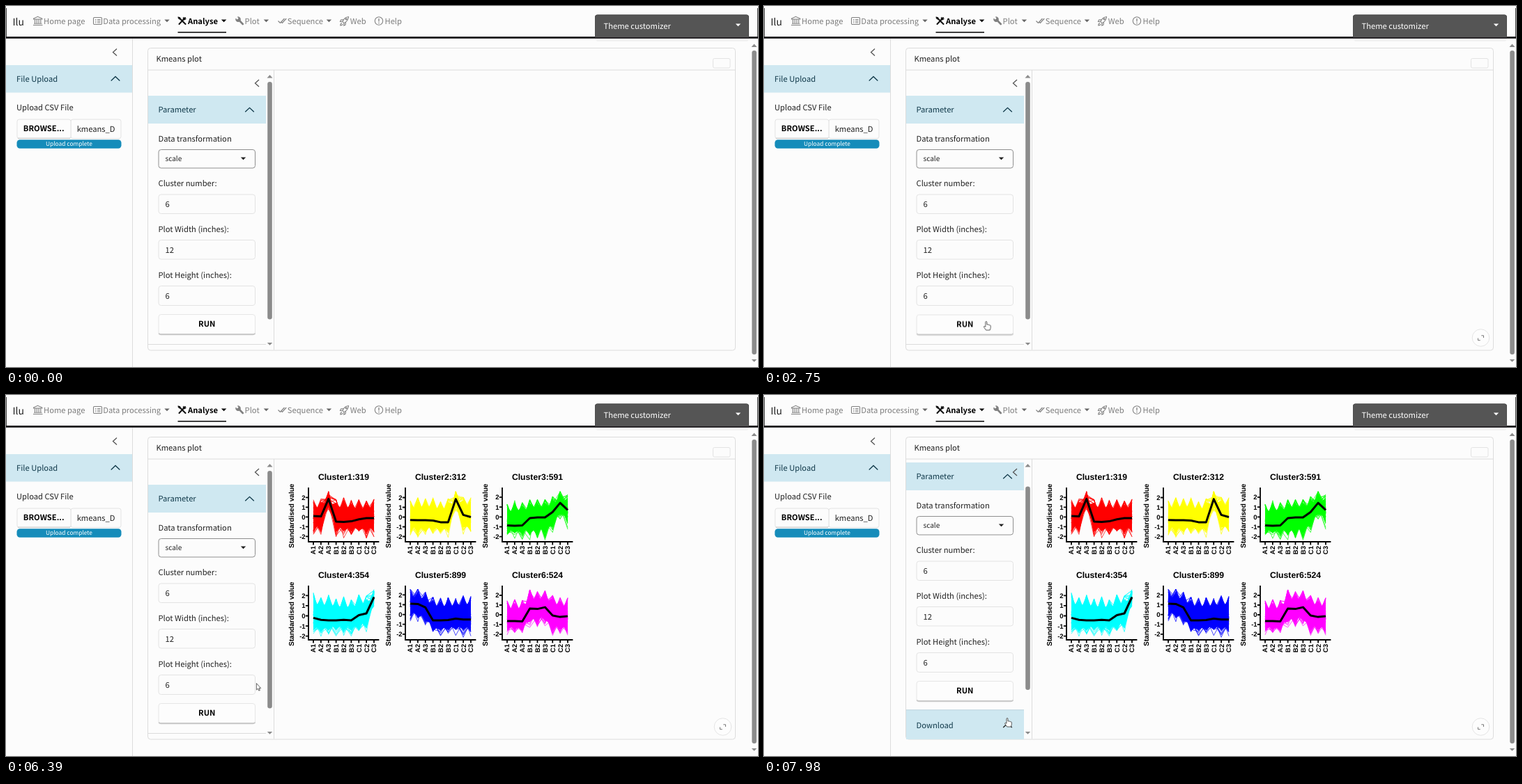
An HTML page that plays this animation: 1079x519 px, repeating every 8 s.

```html
<!DOCTYPE html>
<html lang="en">
<head>
<meta charset="utf-8">
<title>Kmeans plot</title>
<style>
html, body { margin: 0; width: 100%; height: 100%; overflow: hidden; background: #fcfcfc; }
svg { display: block; }
text {
  font: 11.2px 'Noto Sans CJK SC', 'Noto Sans CJK JP', 'Noto Sans CJK TC', 'Noto Sans CJK KR', 'Noto Sans CJK', 'Open Sans', sans-serif;
  fill: #222; white-space: pre; text-rendering: geometricPrecision;
}
.brand { font-size: 14px; }
.nav text { fill: #7d7d7d; }
.nav .on, .strong { font-weight: 700; fill: #000; }
.small { font-size: 10px; }
.tiny { font-size: 8.4px; fill: #fff; }
.head { fill: #10394a; }
.mid { text-anchor: middle; }
.blue { fill: #cfe8f1; }
.icon { fill: none; stroke: #808080; stroke-width: 1.1; }
.caret { fill: #666; }
.dark { fill: #222; }
.chev { fill: none; stroke: #10394a; stroke-width: 1.3; }
.grey { stroke: #555; }
.line { fill: none; stroke: #dcdcdc; }
.field { fill: #fcfcfc; stroke: #e3e3e3; }
.bar { fill: #8b8b8b; }
.plot text { font: 700 10.1px 'Liberation Sans', Arial, sans-serif; fill: #000; }
.plot .title { font-size: 12.2px; }
.plot .tick { font-size: 9.5px; }

#cursor, #arrow, #hand, #fab, #plots, #run, #scroll, #thumb, #open, #fold { animation: 8s linear infinite; }
#cursor { animation-name: travel; }
#arrow { animation-name: arrow; animation-timing-function: step-end; }
#hand { animation-name: hand; animation-timing-function: step-end; }
#fab { animation-name: fab; animation-timing-function: step-end; }
#plots { animation-name: plots; animation-timing-function: step-end; }
#run { animation-name: press; animation-timing-function: step-end; }
#scroll { animation-name: scroll; }
#thumb { animation-name: thumb; }
#open { animation-name: open; }
#fold { animation-name: fold; transform-origin: 349.5px 507px; }

@keyframes travel {
  0%, 3.4% { transform: translate(708px, -14px); }
  3.5% { transform: translate(707px, -6px); }
  8% { transform: translate(672px, 20px); }
  13.5% { transform: translate(624px, 51px); }
  15.25% { transform: translate(618.5px, 56px); }
  16.1% { transform: translate(609px, 66px); }
  18.75% { transform: translate(503px, 160px); }
  20.6% { transform: translate(432px, 240px); }
  22.3% { transform: translate(397px, 350px); }
  23.75% { transform: translate(362px, 436px); }
  24.5% { transform: translate(350px, 439px); }
  26.5% { transform: translate(336px, 444px); }
  29% { transform: translate(325px, 449px); }
  30.75%, 34.2% { transform: translate(314px, 454px); }
  36% { transform: translate(360px, 444px); }
  39.5% { transform: translate(540px, 405px); }
  42.5% { transform: translate(670px, 376px); }
  44.4%, 62% { transform: translate(699px, 370px); }
  64.5% { transform: translate(645px, 381px); }
  68.1% { transform: translate(547.5px, 420px); }
  70.5%, 74.2% { transform: translate(536px, 431px); }
  77% { transform: translate(450px, 429px); }
  79.9%, 85% { transform: translate(358.5px, 414px); }
  89% { transform: translate(353px, 446px); }
  91.5%, 100% { transform: translate(349px, 464px); }
}
@keyframes arrow { 0% { opacity: 1; } 24.2% { opacity: 0; } 35.9% { opacity: 1; } 90% { opacity: 0; } 100% { opacity: 0; } }
@keyframes hand { 0% { opacity: 0; } 24.2% { opacity: 1; } 35.9% { opacity: 0; } 90% { opacity: 1; } 100% { opacity: 1; } }
@keyframes fab { 0% { opacity: 0; } 15.8% { opacity: 1; } 100% { opacity: 1; } }
@keyframes plots { 0% { opacity: 0; } 55.25% { opacity: 1; } 100% { opacity: 1; } }
@keyframes press { 0% { transform: none; } 24.2% { transform: translateY(.5px); } 35.9% { transform: none; } 100% { transform: none; } }
@keyframes scroll {
  0%, 81.4% { transform: translateY(0); animation-timing-function: ease-out; }
  83.3%, 92.6% { transform: translateY(-31px); }
  93.6%, 100% { transform: translateY(-32px); }
}
@keyframes thumb {
  0%, 81.4% { y: 109px; height: 341.5px; animation-timing-function: ease-out; }
  83.3%, 92.6% { y: 135px; height: 342px; animation-timing-function: ease; }
  97%, 100% { y: 131.5px; height: 292.5px; }
}
@keyframes open { 0%, 92.6% { opacity: 0; } 94.6%, 100% { opacity: 1; } }
@keyframes fold {
  0%, 92.6% { transform: rotate(0); animation-timing-function: ease-in-out; }
  95.1%, 100% { transform: rotate(-180deg); }
}
</style>
</head>
<body>
<svg width="1079" height="519" viewBox="0 0 1079 519">
  <defs>
    <clipPath id="panel"><rect x="204" y="93" width="169.5" height="401.5"/></clipPath>
    <clipPath id="name"><rect x="95" y="164" width="61.5" height="26"/></clipPath>
    <path id="down" d="M0 0h7.4L3.7 3.8Z"/>
    <path id="up" d="M0 0L4 -4.5L8 0Z"/>
    <path id="back" d="M6 0L.5 5L6 10"/>
    <path id="top" d="M0 6.5L6.3 .5L12.6 6.5"/>
  </defs>
  <rect width="1079" height="519" fill="#fcfcfc"/>

  <!-- top bar -->
  <path d="M.5 3V46M1078.5 3V46" stroke="#333" stroke-width=".9"/>
  <rect x="0" y="44" width="1079" height="2.8" fill="#1b181c"/>
  <text class="brand" x="9.5" y="28">Ilu</text>
  <g class="nav">
    <g class="icon">
      <path d="M39.5 19V18L45.5 15.3L51.8 18V19ZM39 27.5H52.5M40 25.3H51.5M41.5 19.5V25M44.2 19.5V25M47 19.5V25M49.8 19.5V25"/>
      <rect x="125.5" y="16.5" width="12" height="10" rx="1.2"/>
      <path d="M128 19.5h1.5M131 19.5h4.5M128 21.7h1.5M131 21.7h4.5M128 24h1.5M131 24h4.5"/>
      <path d="M390.5 21.5l3 3l6-6.5M394.8 23l1.6 1.5l5.8-6.5" stroke-width="1.2"/>
      <path d="M483 22.5Q485.5 16 491.5 15.5Q491 21.5 485 24.8ZM484 19.8L480.5 20L479.5 22.5L482.5 22.5M487.5 23.5L487 27L484.8 28L485 25M482 24.5Q479.8 25 479.8 28Q482.5 27.8 483.2 26"/>
      <circle cx="488.2" cy="18.8" r="1"/>
      <circle cx="535" cy="21.5" r="5.7"/>
      <path d="M535 18V22.6M535 23.8V25.2" stroke-width="1.3"/>
    </g>
    <path d="M334.5 20.5L339.8 26" stroke="#808080" stroke-width="2.6" stroke-linecap="round"/>
    <path d="M331.8 15.6A3.8 3.8 0 1 1 329.6 17.6L331.8 19.6L333.6 17.8Z" fill="#808080"/>
    <path d="M248.5 17L257.5 26M257 17L248.5 26" stroke="#111" stroke-width="2" stroke-linecap="round"/>
    <path d="M246.6 15.2l3.4 1l.8 2.6l-2.2 .6l-1.9-2ZM255.2 15.6a3 3 0 0 0-1 4a3 3 0 0 0 4.7-1.8l-2 .6l-1.4-1.2Z" fill="#111"/>
    <text x="54" y="25.5">Home page</text>
    <text x="139.3" y="25.5">Data processing</text>
    <text class="on" x="261" y="25.5">Analyse</text>
    <text x="342.6" y="25.5">Plot</text>
    <text x="403.8" y="25.5">Sequence</text>
    <text x="493.8" y="25.5">Web</text>
    <text x="543.5" y="25.5">Help</text>
    <g class="caret">
      <use href="#down" x="227.3" y="19.5"/><use href="#down" x="308.9" y="19.5" fill="#000"/>
      <use href="#down" x="369.7" y="19.5"/><use href="#down" x="459.7" y="19.5"/>
    </g>
    <rect x="246.5" y="37" width="69.5" height="1.6" fill="#111"/>
  </g>
  <rect x="847" y="46.5" width="218" height="4.5" rx="2" fill="#000" opacity=".035"/>
  <path d="M845 45V16Q845 12.5 848.5 12.5H1062.5Q1066 12.5 1066 16V45Z" fill="#555"/>
  <path d="M845.5 45V16Q845.5 13 848.5 13H1062.5Q1065.5 13 1065.5 16V45" fill="none" stroke="#4d4d4d"/>
  <text x="857.5" y="32.5" style="fill:#fff">Theme customizer</text>
  <use href="#down" x="1046.8" y="25.5" fill="#fff"/>

  <!-- sidebar -->
  <path class="line" d="M181.5 47V519"/>
  <use class="chev grey" href="#back" x="153" y="61.5"/>
  <rect class="blue" y="85" width="181" height="39.5"/>
  <text class="head" x="15" y="109">File Upload</text>
  <use class="chev" href="#top" x="150.7" y="101"/>
  <text x="15" y="150">Upload CSV File</text>
  <rect class="field" x="93" y="163" width="72" height="27.5" rx="3"/>
  <rect class="field" x="16" y="163" width="77" height="27.5" rx="3"/>
  <path d="M17 190.3H92" stroke="#d2d2d2" stroke-width="1.6"/>
  <text class="strong" x="24.8" y="180">BROWSE...</text>
  <text x="101.7" y="181" clip-path="url(#name)">kmeans_D</text>
  <rect x="15.5" y="192.3" width="150" height="12.4" rx="4.5" fill="#158cba"/>
  <text class="tiny mid" x="90.5" y="201.3">Upload complete</text>

  <!-- page scrollbar -->
  <g class="bar">
    <use href="#up" x="1069.5" y="59"/>
    <rect x="1070.3" y="64" width="6.6" height="437" rx="3.3"/>
    <use href="#down" x="1069.8" y="508"/>
  </g>

  <!-- card -->
  <rect class="line" x="203.5" y="60.5" width="843" height="434.5" rx="4"/>
  <path class="line" d="M204 92H1046M384.5 92V494.5"/>
  <text x="215.5" y="80">Kmeans plot</text>
  <rect class="field" x="1014.5" y="75.5" width="24.5" height="13.5" rx="2"/>

  <g clip-path="url(#panel)">
    <g id="scroll">
      <rect class="blue" x="204" y="129" width="169" height="40"/>
      <text class="head" x="218.5" y="153">Parameter</text>
      <use class="chev" href="#top" x="343.2" y="145.8"/>
      <text x="218.5" y="195">Data transformation</text>
      <rect x="219" y="206.5" width="138.5" height="26.5" rx="3.5" fill="#fcfcfc" stroke="#8f8f8f"/>
      <text class="small" x="228.5" y="222.8">scale</text>
      <use class="dark" href="#down" x="336.8" y="217.5"/>
      <text x="218.5" y="259">Cluster number:</text>
      <rect class="field" x="219" y="271" width="138.5" height="27.5" rx="3.5"/>
      <text x="228.5" y="289">6</text>
      <text x="218.5" y="325">Plot Width (inches):</text>
      <rect class="field" x="219" y="336.5" width="138.5" height="27.5" rx="3.5"/>
      <text x="228.5" y="354.7">12</text>
      <text x="218.5" y="390.5">Plot Height (inches):</text>
      <rect class="field" x="219" y="402.5" width="138.5" height="28" rx="3.5"/>
      <text x="228.5" y="420.7">6</text>
      <g id="run">
        <path d="M219 447V470Q219 472 222 472H354.5Q357.5 472 357.5 470V447Q357.5 443.5 354 443.5H222.5Q219 443.5 219 447Z" fill="#fdfdfd" stroke="#e6e6e6"/>
        <path d="M219.5 470.5Q220 472.2 222.5 472.2H354Q356.7 472.2 357.2 470.5" fill="none" stroke="#cacaca" stroke-width="2.2"/>
        <text class="strong mid" x="288.3" y="461">RUN</text>
      </g>
      <path class="line" d="M204 486.5H373"/>
      <text x="218.5" y="511">Download</text>
      <g id="open">
        <rect class="blue" x="204" y="485" width="169" height="42"/>
        <path d="M204 484.8H373" stroke="#b9d2dc"/>
        <text class="head" x="218.5" y="511">Download</text>
      </g>
      <g id="fold"><path class="chev" style="stroke:#222" d="M343.2 504L349.5 510L355.8 504"/></g>
    </g>
  </g>
  <use class="chev grey" href="#back" x="357" y="106"/>
  <g class="bar">
    <use href="#up" x="374.5" y="103.5"/>
    <rect id="thumb" x="375.2" y="109" width="6.6" height="341.5" rx="3.3"/>
    <use href="#down" x="374.8" y="484"/>
  </g>

  <g id="plots"></g>

  <g id="fab">
    <circle cx="1028.5" cy="477" r="12.3" fill="#fdfdfd" stroke="#e4e4e4"/>
    <path d="M1029.3 473.8H1032.5V477M1027.7 480.7H1024.5V477.5" fill="none" stroke="#777"/>
  </g>

  <g id="cursor" fill="#fff" stroke="#333" stroke-width=".8" stroke-linejoin="round">
    <path id="arrow" d="M.4 .4V9.8L2.5 8L3.9 11L5.4 10.4L4.1 7.4H6.7Z"/>
    <path id="hand" d="M-1 1.2Q0-.4 1 1.2V5Q2.1 4.2 2.9 5.3Q4 4.6 4.7 5.8Q6 5.4 6.3 6.8V9.8L5.3 13H-.3L-3.6 8.2Q-3.4 6.5-1 8.2Z"/>
  </g>
</svg>
<script>
const STEP = 10.875;
const DAYS = ['A1', 'A2', 'A3', 'B1', 'B2', 'B3', 'C1', 'C2', 'C3'];

// zero: height of value 0 inside the panel, unit: pixels per value
const CLUSTERS = [
  { size: 319, color: '#f00', zero: 175.3, unit: 14, low: -1.95,
    mean: [.1, .05, 1.85, -.48, -.52, -.45, -.25, -.13, -.13],
    high: [1.8, 1.9, 2.65, 1.8, 2, 1.75, 1.8, 1.65, 1.9] },
  { size: 312, color: '#ff0', zero: 175.5, unit: 14, low: -1.9,
    mean: [-.3, -.32, -.32, -.36, -.53, -.53, 1.85, .22, 0],
    high: [1.75, 2, 1.9, 2, 1.6, 1.9, 2.65, 2.1, 2] },
  { size: 591, color: '#0f0', zero: 175.3, unit: 14.2, low: -2.1,
    mean: [-.85, -.9, -.86, -.12, -.05, -.05, .5, 1.42, .7],
    high: [1.3, 1.7, 1.5, 1.8, 1.8, 1.8, 2.1, 2.65, 2.3] },
  { size: 354, color: '#0ff', zero: 176.5, unit: 14.6, low: -1.85,
    mean: [-.2, -.4, -.45, -.45, -.4, -.45, .07, .24, 1.85],
    high: [2.3, 1.8, 2.1, 1.7, 1.9, 1.6, 2.1, 2, 2.6] },
  { size: 899, color: '#00f', zero: 174.6, unit: 14.1, low: -2.1,
    mean: [1.1, 1.08, .72, -.6, -.6, -.56, -.42, -.5, -.5],
    high: [2.6, 2.6, 2.3, 1.8, 1.7, 1.8, 1.7, 2, 1.9] },
  { size: 524, color: '#f0f', zero: 175, unit: 14, low: -2.05,
    mean: [-.64, -.64, -.68, .65, .6, .78, -.07, -.22, -.14],
    high: [1.5, 1.6, 1.5, 2.6, 2.4, 2.6, 2.1, 1.8, 1.8] }
];

let seed = 7;
const rand = () => (seed = seed * 16807 % 2147483647) / 2147483647;

function drawCluster(c, k) {
  const dx = k % 3 * 139, dy = Math.floor(k / 3) * 141;
  const pt = (i, v) => `${(441 + i * STEP).toFixed(1)},${(c.zero - v * c.unit).toFixed(1)}`;
  const poly = points => 'M' + points.join('L');
  const curve = values => poly(values.map((v, i) => pt(i, v)));
  // the band's lower edge rises where the cluster peaks
  const floor = c.mean.map(m => c.low + 1.4 * Math.max(0, m));

  // solid core: peaks on each day, dips in between
  const upper = [], lower = [];
  c.high.forEach((h, i) => {
    upper.push(pt(i, h - .35));
    lower.unshift(pt(i, floor[i] + .3 + rand() * .25));
    if (i < 8) {
      upper.push(pt(i + .5, (h + c.high[i + 1]) / 2 - .9));
      lower.unshift(pt(i + .5, (floor[i] + floor[i + 1]) / 2 + .7 + rand() * .2));
    }
  });
  const core = poly([...upper, ...lower]) + 'Z';

  let strands = '';
  for (let n = 0; n < 72; n++) {
    const peak = n % 9, dip = Math.floor(rand() * 9);
    strands += curve(c.mean.map((m, i) => {
      if (i === peak) return c.high[i] - rand() * rand() * .7;
      if (i === dip) return floor[i] - .25 + Math.sqrt(rand()) * .8;
      return Math.max(floor[i], Math.min(c.high[i], m + (rand() + rand() + rand() - 1.5) * .7));
    }));
  }

  let axes = 'M434 134V211H534.5', labels = '';
  for (let v = -2; v <= 2; v++) {
    const y = c.zero - v * c.unit;
    axes += `M430.8 ${y}H434`;
    labels += `<text class="tick" x="429.6" y="${y + 3.4}" text-anchor="end">${v}</text>`;
  }
  DAYS.forEach((day, i) => {
    const x = 441 + i * STEP;
    axes += `M${x} 211V214.6`;
    labels += `<text class="tick" transform="translate(${x + 3.4} 217) rotate(-90)" text-anchor="end">${day}</text>`;
  });

  return `<g class="plot" transform="translate(${dx} ${dy})" fill="none">
    <path d="${core}" fill="${c.color}"/>
    <path d="${strands}" stroke="${c.color}" stroke-width=".7"/>
    <path d="${curve(c.mean)}" stroke="#000" stroke-width="3" stroke-linejoin="round"/>
    <path d="${axes}" stroke="#000" stroke-width="1.8" stroke-linecap="square"/>
    <text class="title mid" x="484.5" y="122.3">Cluster${k + 1}:${c.size}</text>
    <text class="mid" transform="translate(413 173.8) rotate(-90)">Standardised value</text>
    ${labels}</g>`;
}

document.getElementById('plots').innerHTML = CLUSTERS.map(drawCluster).join('');
</script>
</body>
</html>
```
